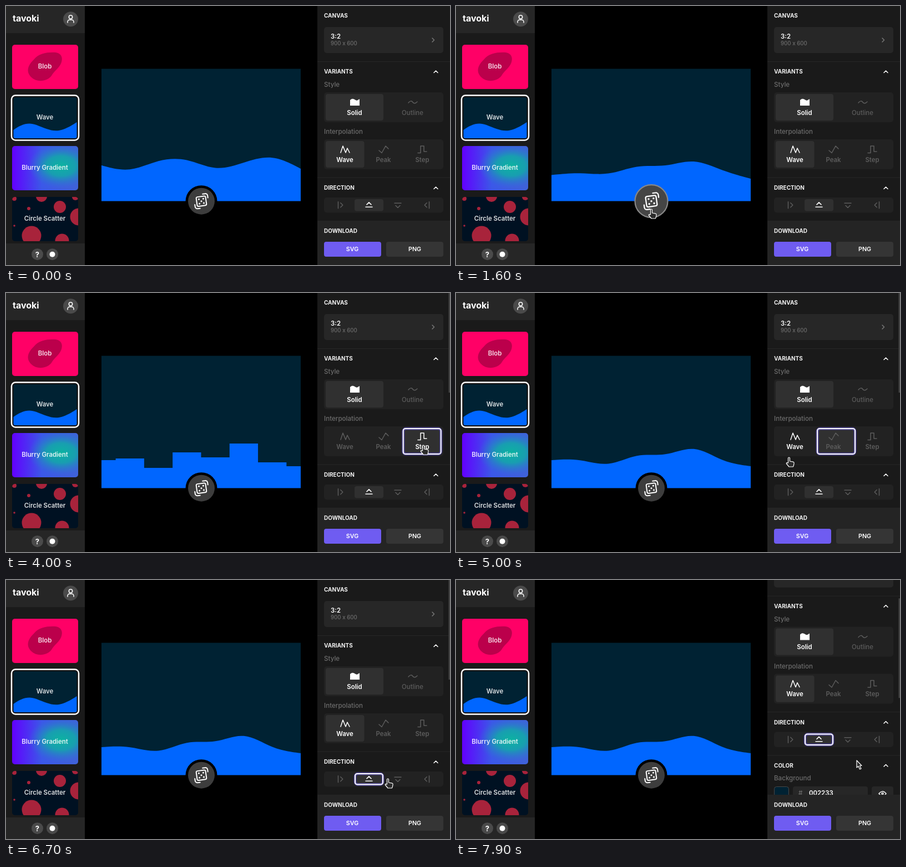
Recreate the animation shown at these times as an HTML page. Size 800x468 px, loop 8000 ms.

```html
<!DOCTYPE html>
<html lang="en">
<head>
<meta charset="utf-8">
<title>Wave generator</title>
<style>
html, body { margin: 0; width: 100%; height: 100%; overflow: hidden; background: #000; }
svg { display: block; width: 100%; height: 100%; }
text { font: 600 11.4px Inter, "Noto Sans", sans-serif; fill: #fff; }
.mid { text-anchor: middle; }
.card { fill: #fff; fill-opacity: .86; text-anchor: middle; }
.head { font-size: 10px; font-weight: 700; fill: #f2f2f2; }
.label { font-weight: 500; font-size: 11.6px; fill: #6c6c6c; }
.group { fill: #222; }
.active { fill: #303030; }
.rule { stroke: #272727; }
.line { fill: none; stroke: currentColor; stroke-width: 1.5; stroke-linejoin: round; stroke-linecap: round; }
.option { color: #5c5c5c; }
.option.on { color: #fff; }
.option text { fill: currentColor; text-anchor: middle; }
.ring rect { fill: none; stroke: #fff; stroke-width: 2; }
.ring .glow { stroke: #6c5ce7; stroke-opacity: .55; stroke-width: 5; }
</style>
</head>
<body>
<svg viewBox="0 0 800 468" preserveAspectRatio="none">
  <defs>
    <clipPath id="scatterClip"><rect x="11" y="345" width="119" height="80" rx="5"/></clipPath>
    <clipPath id="panelClip"><rect x="561" width="239" height="388"/></clipPath>
    <linearGradient id="violet"><stop stop-color="#6200ff"/><stop offset=".45" stop-color="#3b58e8"/><stop offset="1" stop-color="#3f62d8"/></linearGradient>
    <radialGradient id="teal" cx=".74" cy=".45" r=".5"><stop stop-color="#0cb3a0"/><stop offset=".45" stop-color="#14a5ab" stop-opacity=".9"/><stop offset="1" stop-color="#2b77d0" stop-opacity="0"/></radialGradient>
    <g id="chevron"><path class="line" style="color:#fff" d="M-3.5 2L0-1.5 3.5 2"/></g>
    <g id="arrowIcon"><path class="line" d="M-3.5-6V6M.8-4L4.8 0 .8 4"/></g>
  </defs>

  <!-- Preview -->
  <rect x="172" y="113.5" width="359" height="239" fill="#002233"/>
  <path id="wave" fill="#0066ff"/>
  <path id="edge" d="M232 352.6H531" stroke="#57636b" stroke-width=".8" stroke-dasharray="2 1"/>
  <g transform="translate(352 352.7)">
    <circle r="28.5" fill="#000"/>
    <circle id="dice"/>
    <g id="diceIcon" fill="none" stroke="#fff" stroke-width="2" stroke-linecap="round">
      <rect x="-8.5" y="-8.5" width="17" height="17" rx="2.5"/>
      <path d="M4-12.5H8.500a4 4 0 0 1 4 4V-4.500M-4 12.500H-8.500a4 4 0 0 1-4-4V4.500"/>
      <path stroke-width="3" d="M-4-4h.01M4-4h.01M0 0h.01M-4 4h.01M4 4h.01"/>
    </g>
  </g>

  <!-- Sidebar -->
  <rect width="142" height="468" fill="#1a1a1a"/>
  <rect width="142" height="49" fill="#262626"/>
  <text x="12" y="28" style="font-size:16px;font-weight:700">tavoki</text>
  <circle cx="116.500" cy="23.700" r="13.500" fill="#4a4a4a"/>
  <g class="line" style="color:#fff"><circle cx="116.500" cy="20" r="3.200"/><path d="M111 30V28.500a3.500 3.500 0 0 1 3.500-3.500h4a3.500 3.500 0 0 1 3.500 3.500V30"/></g>

  <rect x="11" y="70" width="119" height="80" rx="5" fill="#ff0066"/>
  <path fill="#bb004b" d="M50 97C59 85 76 83 90 84 101 86 103 95 99 104 94 114 88 116 82 126 75 136 56 139 46 129 37 121 37 109 50 97Z"/>
  <text class="card" x="70" y="113">Blob</text>

  <rect x="10" y="161.500" width="121" height="81" rx="7" fill="#111" stroke="#fff" stroke-width="2.500"/>
  <rect x="13.500" y="165" width="114" height="74" rx="3" fill="#002233"/>
  <path fill="#0066ff" d="M13.500 224C27 214 40 209 55 215 73 222 86 229 103 223 114 219 121 214 127.500 210V236a3 3 0 0 1-3 3H16.500a3 3 0 0 1-3-3Z"/>
  <text class="card" x="70" y="205">Wave</text>

  <rect x="11" y="253" width="119" height="80" rx="5" fill="url(#violet)"/>
  <rect x="11" y="253" width="119" height="80" rx="5" fill="url(#teal)"/>
  <text class="card" x="70" y="296">Blurry Gradient</text>

  <g clip-path="url(#scatterClip)" fill="#a8233b">
    <rect x="11" y="345" width="119" height="80" fill="#001122"/>
    <circle cx="64" cy="344" r="10"/><circle cx="97" cy="363" r="11"/><circle cx="131" cy="381" r="15.500"/>
    <circle cx="46" cy="415" r="17.500"/><circle cx="101" cy="424" r="12.500"/><circle cx="125" cy="345" r="6"/>
    <circle cx="15" cy="348" r="4"/><circle cx="41" cy="366" r="3"/><circle cx="15" cy="397" r="1.800"/>
  </g>
  <text class="card" x="70" y="388">Circle Scatter</text>

  <rect y="429" width="142" height="39" fill="#262626"/>
  <g fill="#4a4a4a"><circle cx="56.500" cy="448.700" r="10.500"/><circle cx="83.500" cy="448.700" r="10.500"/></g>
  <text class="mid" x="56.500" y="453.500" style="font-size:13px;font-weight:700">?</text>
  <circle cx="83.500" cy="448.700" r="5" fill="#fff"/>

  <!-- Settings -->
  <rect x="561" width="239" height="468" fill="#1a1a1a"/>
  <g clip-path="url(#panelClip)">
    <g id="scroller">
      <text class="head" x="573" y="21">CANVAS</text>
      <rect x="573" y="38" width="215" height="47" rx="5" fill="#272727"/>
      <text x="585" y="59">3:2</text>
      <text class="label" x="585" y="71" style="font-size:9.700px">900 x 600</text>
      <path class="line" style="color:#777" d="M768 58l3.500 3.500-3.500 3.500"/>
      <path class="rule" d="M561 100.500H800M561 310H800M561 388.500H800"/>

      <text class="head" x="573" y="122">VARIANTS</text><use href="#chevron" x="774.500" y="118.500"/>
      <text class="label" x="573" y="146">Style</text>
      <rect class="group" x="573" y="156" width="215" height="54" rx="5"/>
      <rect class="active" x="576" y="159" width="104" height="48" rx="4"/>
      <g class="option on"><path fill="#fff" d="M620 170C624 166 627 168 630 170S635 169 637 168V180H620Z"/><text x="628" y="196.500">Solid</text></g>
      <g class="option"><path class="line" d="M725 175C728 171 731 171 733 174S738 176 741 173"/><text x="732.500" y="196.500" style="font-weight:500">Outline</text></g>

      <text class="label" x="573" y="231">Interpolation</text>
      <rect class="group" x="573" y="241" width="215" height="54" rx="5"/>
      <rect class="active" id="modeSlide" y="244" width="69.500" height="48" rx="4"/>
      <g class="option mode"><path class="line" d="M603 265L607 253 612 265 615 257 619 265"/><text x="610.500" y="281.500">Wave</text></g>
      <g class="option mode"><path class="line" d="M672 261L677 265.500 684 253 689 258"/><text x="680" y="281.500">Peak</text></g>
      <g class="option mode"><path class="line" d="M742 265.500H747V253H753V263H758"/><text x="750" y="281.500">Step</text></g>

      <text class="head" x="573" y="332">DIRECTION</text><use href="#chevron" x="774.500" y="328.500"/>
      <rect class="group" x="573" y="346" width="215" height="27.500" rx="5"/>
      <rect class="active" id="dirSlide" y="349" width="52" height="21.500" rx="4"/>
      <use class="option dir" href="#arrowIcon" transform="translate(602 359.700)"/>
      <use class="option dir" href="#arrowIcon" transform="translate(654 359.700) rotate(-90)"/>
      <use class="option dir" href="#arrowIcon" transform="translate(706 359.700) rotate(90)"/>
      <use class="option dir" href="#arrowIcon" transform="translate(759 359.700) rotate(180)"/>

      <text class="head" x="573" y="410">COLOR</text><use href="#chevron" x="774.500" y="406.500"/>
      <text class="label" x="573" y="433">Background</text>
      <rect x="573.500" y="445" width="26" height="26" rx="4" fill="#002233" stroke="#484848"/>
      <rect x="607" y="444.500" width="135" height="27" rx="4" fill="#272727"/>
      <text class="label" x="617" y="460.500">#</text>
      <text x="636" y="460.500">002233</text>
      <rect x="749" y="444.500" width="39" height="27" rx="4" fill="#272727"/>
      <g class="line" style="color:#fff"><path d="M762 457.500Q768.500 449.500 775 457.500 768.500 465.500 762 457.500Z"/><circle cx="768.500" cy="457.500" r="1.500"/></g>

      <g class="ring" id="ring"><rect class="glow" rx="5"/><rect rx="4"/></g>
    </g>
    <rect id="scrollbar" x="797.500" width="2.500" height="180" fill="#424242"/>
  </g>
  <rect x="561" y="388" width="239" height="80" fill="#242424"/>
  <text class="head" x="573" y="410">DOWNLOAD</text>
  <rect x="573" y="426" width="103" height="27" rx="4" fill="#6f5cf1"/>
  <rect x="685" y="426" width="103" height="27" rx="4" fill="#353535"/>
  <text class="mid" x="624" y="443.200" style="font-size:10.700px">SVG</text>
  <text class="mid" x="736.500" y="443.200" style="font-size:10.700px">PNG</text>

  <g id="cursor" fill="#2b2b2b" stroke="#fff" stroke-width="1.200" stroke-linejoin="round">
    <path id="hand" d="M-1.500 10V1.500a1.500 1.500 0 0 1 3 0V7l6 1.200q1.800.4 1.600 2.200l-.8 4.600-1 2H0l-4.500-5.500q-.8-1.600 1-1.800z"/>
    <path id="arrow" d="M0 0V13l3-2.500L5.500 16 8 15 5.500 9.500H9z"/>
  </g>
</svg>
<script>
const LOOP = 8000, STEP = 100;
const LEFT = 172, TOP = 113.5, WIDTH = 359, HEIGHT = 239, BASE = TOP + HEIGHT;
const $ = id => document.getElementById(id);
const set = (el, attrs) => { for (const k in attrs) el.setAttribute(k, attrs[k]); };
const show = (el, on) => { el.style.display = on ? '' : 'none'; };
const between = (t, a, b) => t >= a && t < b;

// Eased value of a track of [time, ...values] keys.
function track(t, keys) {
  if (t <= keys[0][0]) return keys[0].slice(1);
  const i = keys.findIndex(k => k[0] > t);
  if (i < 0) return keys[keys.length - 1].slice(1);
  const [a, b] = [keys[i - 1], keys[i]];
  const u = (t - a[0]) / (b[0] - a[0]), e = u * u * (3 - 2 * u);
  return a.slice(1).map((v, n) => v + (b[n + 1] - v) * e);
}

const first = [288, 301.6, 276.7, 273.8, 299.6, 282.8, 267.1, 294];
const second = [316, 303, 282, 279, 277, 280, 275, 309];
const third = [302, 299, 316, 288, 297, 272, 306, 313];
const heights = [[800, ...first], [1200, ...second], [1400, ...second], [1697, ...third]];

const modeKeys = [[2899, 576], [2900, 643], [3000, 645.2], [3500, 645.2], [3900, 714.7], [4790, 714.7], [5230, 576]];
const dirKeys = [[5600, 628], [5850, 576], [6250, 576], [6500, 628]];
const cursorKeys = [
  [400, 400, 448], [700, 354, 372], [900, 352, 367], [1700, 352, 367], [2200, 682, 274], [2500, 685, 273],
  [3000, 685, 273], [3350, 752, 273], [4000, 752, 275], [4600, 610, 275], [4800, 606, 282],
  [5000, 600, 297], [5400, 601, 358], [5900, 601, 358], [6250, 657, 359], [6400, 660, 359],
  [6700, 688, 359], [7200, 722, 326]
];
const hoverKeys = [[600, 0], [800, 1], [1800, 1], [2000, 0]];

// Outline as [along, height] command points: uniform cubic B-spline, straight or stepped.
function outline(ys, mode, point) {
  const gap = WIDTH / (ys.length - 1);
  const at = (i, y) => point(i * gap, BASE - y);
  const last = ys.length - 1;
  let d = 'M' + point(0, 0) + 'L' + at(0, ys[0]);
  if (mode === 1) ys.forEach((y, i) => d += 'L' + at(i, y));
  if (mode === 2) ys.forEach((y, i) => {
    if (i) d += 'L' + at(i - .5, y);
    d += 'L' + at(Math.min(i + .5, last), y);
  });
  if (mode === 0) {
    const knot = i => i <= 0 ? [0, ys[0]] : i >= last ? [last, ys[last]] : [i, ys[i]];
    const mix = (a, b, c, w) => [0, 1].map(n => (a[n] * w[0] + b[n] * w[1] + c[n] * w[2]) / 6);
    for (let i = 0; i <= last + 1; i++) {
      const [a, b, c] = [knot(i - 1), knot(i), knot(i + 1)];
      d += 'C' + [mix(a, b, c, [4, 2, 0]), mix(a, b, c, [2, 4, 0]), mix(a, b, c, [1, 4, 1])]
        .map(p => at(...p)).join(' ');
    }
  }
  return d + 'L' + point(WIDTH, 0) + 'Z';
}

const upward = (u, h) => [LEFT + u, BASE - h];
const sideways = (u, h) => [LEFT + h * WIDTH / HEIGHT, TOP + u * HEIGHT / WIDTH];

function draw(t) {
  const mode = between(t, 2900, 3500) ? 1 : between(t, 3500, 4800) ? 2 : 0;
  const toLeft = between(t, 5700, 6300);
  set($('wave'), { d: outline(track(t, heights), mode, toLeft ? sideways : upward) });
  show($('edge'), toLeft);

  const [hover] = track(t, hoverKeys);
  set($('dice'), {
    r: 24 + 5.5 * hover, fill: hover > .5 ? '#454545' : '#3d3d3d',
    stroke: '#888', 'stroke-width': 2.2 * hover
  });
  set($('diceIcon'), { transform: `rotate(-8) scale(${1 + .12 * hover})` });

  const [modeX] = track(t, modeKeys), [dirX] = track(t, dirKeys);
  set($('modeSlide'), { x: modeX });
  set($('dirSlide'), { x: dirX });
  document.querySelectorAll('.mode').forEach((el, i) => el.classList.toggle('on', i === mode));
  document.querySelectorAll('.dir').forEach((el, i) => el.classList.toggle('on', i === (toLeft ? 0 : 1)));

  const onDir = t >= 5600;
  show($('ring'), t >= 2900);
  for (const r of $('ring').children) set(r, onDir
    ? { x: dirX + 1, y: 350, width: 50, height: 19.5 }
    : { x: modeX + 1, y: 245, width: 68, height: 46 });

  const [scroll] = t < 7300 ? [0] : [Math.min(1, (t - 7300) / 600) * 71.5];
  set($('scroller'), { transform: `translate(0 ${-scroll})` });
  set($('scrollbar'), { y: scroll * 180 / 388 });
  show($('scrollbar'), t >= 2100);

  const [x, y] = track(t, cursorKeys);
  const pointing = between(t, 700, 1900) || between(t, 2200, 7000);
  set($('cursor'), { transform: `translate(${x} ${y})` });
  show($('cursor'), t >= 500);
  show($('hand'), pointing);
  show($('arrow'), !pointing);
}

const start = performance.now();
function tick() {
  const t = (performance.now() - start) % LOOP;
  draw(Math.floor(t / STEP) * STEP);
  requestAnimationFrame(tick);
}
tick();
</script>
</body>
</html>
```
